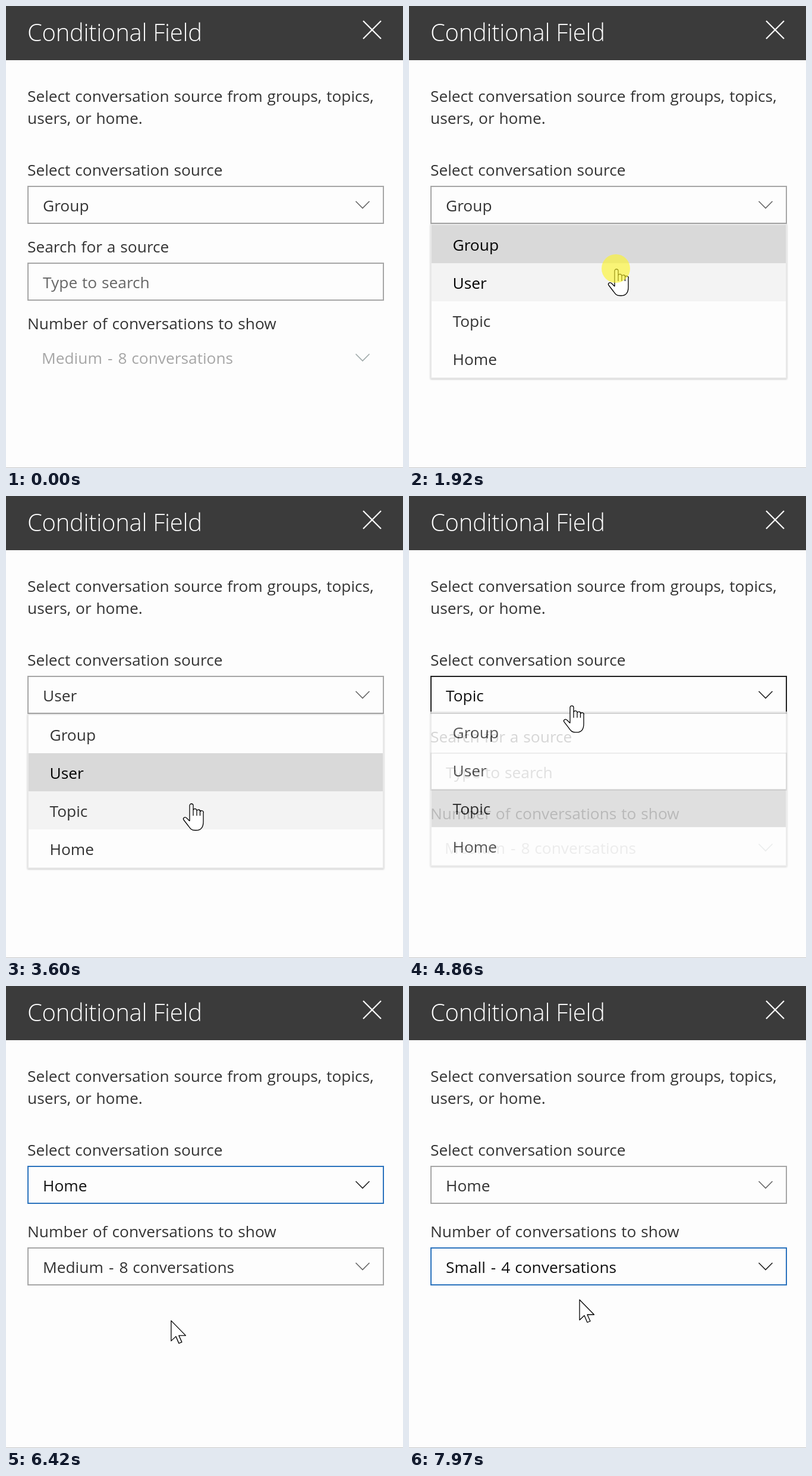
Write an HTML page that moves like this. It is 668 px wide and 776 px high and loops after 8 s.

```html
<!DOCTYPE html>
<html lang="en">
<head>
<meta charset="utf-8">
<title>Conditional Field</title>
<style>
  html, body { margin: 0; width: 100%; height: 100%; overflow: hidden; background: #fdfdfd; }
  svg { display: block; width: 668px; height: 776px; }
  text { font: 400 26.3px "Open Sans", "Noto Sans", sans-serif; word-spacing: 1px; fill: #333; white-space: pre; }
  .title { font-size: 40px; font-weight: 300; word-spacing: 0; letter-spacing: -.3px; fill: #fff; }
  .hint { fill: #666; }
  .box { fill: #fdfdfd; stroke: #a6a6a6; stroke-width: 2; }
  .chevron { fill: none; stroke: #666; stroke-width: 1.6; }
  .hover .box { stroke: #212121; }
  .focus .box { stroke: #2b73bd; }
  .hover text, .focus text { fill: #111; }
  .hover .hint { fill: #666; }
  .hover .chevron, .focus .chevron { stroke: #212121; }
  .off .box { stroke: none; }
  .off text { fill: #a6a6a6; }
  .off .chevron { stroke: #9fa9a9; }
  .panel { fill: #fdfdfd; stroke: #e8e8e8; stroke-width: 2; filter: drop-shadow(0 1px 1.5px rgba(0, 0, 0, .22)); }
  .cursor path { fill: #fff; stroke: #000; stroke-width: 1.3; stroke-linejoin: round; }
</style>
</head>
<body>
<svg id="stage" viewBox="0 0 668 776">
  <rect width="668" height="776" fill="#fdfdfd"/>
  <rect width="668" height="91" fill="#3b3b3b"/>
  <text class="title" x="36" y="59">Conditional Field</text>
  <path d="M601 25L631 55M631 25L601 55" stroke="#fff" stroke-width="2.2"/>
  <text x="36" y="161">Select conversation source from groups, topics,</text>
  <text x="36" y="198">users, or home.</text>
  <text x="36" y="285">Select conversation source</text>
  <rect y="775" width="668" height="1" fill="#c8c8c8"/>
</svg>
<script>
const LOOP = 8000;
const stage = document.getElementById('stage');

function add(parent, tag, attrs = {}) {
  const el = document.createElementNS('http://www.w3.org/2000/svg', tag);
  for (const k in attrs) el.setAttribute(k, attrs[k]);
  parent.append(el);
  return el;
}
function label(parent, x, y, str = '') {
  const el = add(parent, 'text', { x, y });
  setText(el, str);
  return el;
}
// Dashes get a little air on both sides.
function setText(el, str) {
  if (el.dataset.str === str) return;
  el.dataset.str = str;
  el.innerHTML = str.replace(/ - (.*)/, ' <tspan dx="1.2">-</tspan><tspan dx="1.2"> $1</tspan>');
}
const show = (el, on) => el.style.display = on ? '' : 'none';
const shift = (el, x, y) => el.setAttribute('transform', `translate(${x} ${y})`);
const within = (t, [from, to]) => t >= from && t < to;
const latest = (t, steps) => steps.filter(s => s[0] <= t).pop()[1];

// A box whose local origin is its top left corner.
function field(chevron) {
  const g = add(stage, 'g');
  add(g, 'rect', { class: 'box', x: 37, y: 1, width: 598, height: 62 });
  if (chevron) add(g, 'path', { class: 'chevron', d: 'M588.5 26L600 37.5L611.5 26' });
  return { g, text: label(g, 62, 42.5) };
}
// Drops from the bottom edge of a field with the same origin.
function menu(items) {
  const g = add(stage, 'g');
  add(g, 'rect', { class: 'panel', x: 37, y: 65, width: 598, height: items.length * 64 + 2 });
  const rows = items.map((name, i) => ({
    name,
    bg: add(g, 'rect', { x: 38, y: 66 + i * 64, width: 596, height: 64 }),
    text: label(g, 73.5, 108.5 + i * 64, name)
  }));
  return { g, rows };
}

const searchLabel = label(stage, 36, 414, 'Search for a source');
const search = field(false);
search.text.classList.add('hint');
setText(search.text, 'Type to search');
shift(search.g, 0, 431);
const countLabel = label(stage, 36, 543, 'Number of conversations to show');
const source = field(true), count = field(true);
shift(source.g, 0, 302);
const sizes = ['Small', 'Medium', 'Large'].map((s, i) => `${s} - ${4 * (i + 1)} conversations`);
const sourceMenu = menu(['Group', 'User', 'Topic', 'Home']);
const countMenu = menu(sizes);

const cursor = add(stage, 'g', { class: 'cursor' });
const shapes = {
  arrow: 'M0 0V34L8 26.5L13 38L18 36L13 25H24.5Z',
  hand: 'M-2 30V4a3 3 0 0 1 6 0V12a3 3 0 0 1 6 1a2.8 2.8 0 0 1 5.5 1.5a2.8 2.8 0 0 1 5.5 2' +
    'V31C21 40 17 45.5 9 45.5H7C0 45.5-2 41-5 37L-12 28C-14 25-10 22-7 25L-2 30' +
    'M4 12V21M10 13V21M15.5 14.5V21',
  beam: 'M-4-14H4M0-14V14M-4 14H4'
};
for (const k in shapes) shapes[k] = add(cursor, 'path', { d: shapes[k] });
const spot = add(cursor, 'circle', { r: 24, fill: '#fdf62a', opacity: .62 });

// Timeline
const path = [
  [50, 470, 688], [740, 400, 316], [1410, 400, 316], [1770, 348, 441], [2470, 348, 441],
  [2980, 343, 330], [3180, 343, 330], [3600, 311, 516], [3990, 311, 516], [4240, 285, 400],
  [4440, 285, 400], [4620, 267, 324], [4780, 267, 324], [4860, 273, 351], [5210, 263, 519],
  [5340, 263, 519], [5490, 256, 578], [5850, 256, 578], [6110, 270, 609], [6320, 270, 609],
  [6570, 292, 478], [7220, 292, 478], [7500, 287, 527], [LOOP, 287, 527]
];
const presses = [
  [740, 940], [1920, 2100], [3000, 3180], [3780, 3940],
  [4640, 4780], [5640, 5820], [6750, 6985], [7630, 7790]
];
const sourceOpen = [[940, 2100], [3180, 3940], [4780, 5820]];
const countOpen = [[6985, 7790]];
const sourceValue = [[0, 'Group'], [2100, 'User'], [3940, 'Topic'], [5820, 'Home']];
const countValue = [[0, sizes[1]], [7790, sizes[0]]];
const focusOwner = [[0, ''], [2100, 'source'], [6750, ''], [7790, 'count']];

// Speed through a waypoint; zero next to a rest.
function slope(i, k) {
  const a = path[i - 1], p = path[i], b = path[i + 1];
  if (!a || !b || a[2] === p[2] || b[2] === p[2]) return 0;
  return (b[k] - a[k]) / (b[0] - a[0]);
}
function pointer(t) {
  let i = 0;
  while (i < path.length - 2 && t >= path[i + 1][0]) i++;
  const a = path[i], b = path[i + 1], d = b[0] - a[0];
  const u = Math.max(0, (t - a[0]) / d), v = 1 - u;
  return [1, 2].map(k =>
    a[k] * v * v * (1 + 2 * u) + b[k] * u * u * (3 - 2 * u) +
    d * u * v * (v * slope(i, k) - u * slope(i + 1, k)));
}

function drawField(f, hover, focus, off = false) {
  f.g.setAttribute('class', off ? 'off' : hover ? 'hover' : focus ? 'focus' : '');
}
// Returns true when the pointer is on one of the rows.
function drawMenu(m, span, t, top, value, y, pressed) {
  show(m.g, span);
  if (!span) return false;
  const p = 1 - (1 - Math.min(1, (t - span[0]) / 367)) ** 6.6;
  shift(m.g, 0, top - 20 * (1 - p));
  m.g.setAttribute('opacity', p);
  const hot = Math.floor((y - top - 66) / 64);
  m.rows.forEach((r, i) => {
    const chosen = r.name === value;
    r.bg.style.fill = chosen ? '#d9d9d9' : i === hot ? '#f3f3f3' : 'none';
    r.text.style.fill = chosen || (i === hot && pressed) ? '#000' : '#333';
  });
  return hot >= 0 && hot < m.rows.length;
}

function draw(t) {
  const [x, y] = pointer(t);
  const visible = t >= 50;
  const inSpan = s => within(t, s);
  const pressed = presses.some(inSpan);
  const from = latest(t, sourceValue), size = latest(t, countValue), focus = latest(t, focusOwner);
  const sourceSpan = sourceOpen.find(inSpan), countSpan = countOpen.find(inSpan);
  const home = from === 'Home';

  setText(source.text, from);
  setText(count.text, size);
  count.text.setAttribute('x', home ? 62 : 60);
  shift(count.g, 0, home ? 439 : 558.5);
  countLabel.setAttribute('y', home ? 422 : 543);
  show(searchLabel, !home);
  show(search.g, !home);

  const onRow = [
    drawMenu(sourceMenu, sourceSpan, t, 302, from, y, pressed),
    drawMenu(countMenu, countSpan, t, 439, size, y, pressed)
  ].some(Boolean);
  const over = top => visible && !onRow && y >= top && y < top + 64;
  const onSource = over(302), onCount = home && over(439), onSearch = !home && over(431);
  drawField(source, onSource, focus === 'source' && !sourceSpan);
  drawField(count, onCount, focus === 'count' && !countSpan, !home);
  drawField(search, onSearch, false);

  const kind = onRow || onSource || onCount ? 'hand' : onSearch ? 'beam' : 'arrow';
  for (const k in shapes) show(shapes[k], k === kind);
  show(cursor, visible);
  show(spot, pressed);
  shift(cursor, x, y);
}

const start = performance.now();
function tick() {
  draw((performance.now() - start) % LOOP);
  requestAnimationFrame(tick);
}
tick();
</script>
</body>
</html>
```
